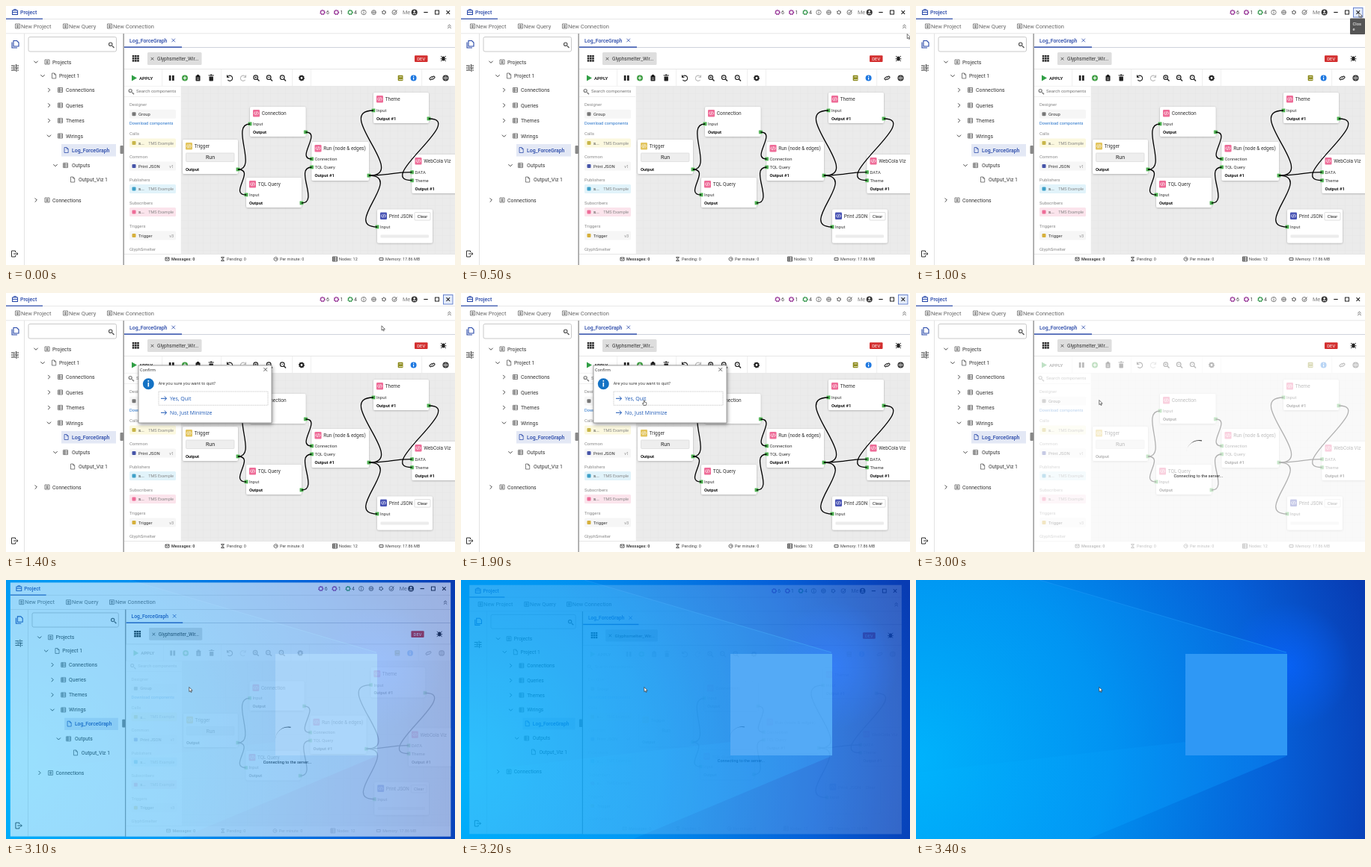
These frames come from a looping animation (600 px wide and 347 px high, 3.5 s). An HTML page:

```html
<!DOCTYPE html>
<html lang="en">
<head>
<meta charset="utf-8">
<title>Closing the project window</title>
<style>
html, body { margin: 0; width: 100%; height: 100%; overflow: hidden; background: #fff; }
svg { display: block; width: 100vw; height: 100vh; font-family: Roboto, Arial, sans-serif; }
.ui { font-family: "Open Sans", "Noto Sans", sans-serif; }
</style>
</head>
<body>
<svg id="stage" viewBox="0 0 600 347"></svg>
<script>
const BLUE = '#2747a8', INK = '#222', GREY = '#666', PINK = '#ee6c98', GREEN = '#4caf50';
const LOOP = 3500, STEP = 100;

const rect = (x, y, w, h, fill, more = '') =>
  `<rect x="${x}" y="${y}" width="${w}" height="${h}" fill="${fill}" ${more}/>`;
const text = (x, y, size, str, fill = INK, more = '') =>
  `<text x="${x}" y="${y}" font-size="${size}" fill="${fill}" ${more}>${str}</text>`;
const icon = (x, y, d, color = INK, width = 1) =>
  `<path transform="translate(${x} ${y})" d="${d}" fill="none" stroke="${color}" stroke-width="${width}"/>`;
const solid = (x, y, d, color = INK) =>
  `<path transform="translate(${x} ${y})" d="${d}" fill="${color}"/>`;
const dot = (x, y, r, fill, more = '') =>
  `<circle cx="${x}" cy="${y}" r="${r}" fill="${fill}" ${more}/>`;
const ring = (x, y, r, color, width = 1) =>
  dot(x, y, r, 'none', `stroke="${color}" stroke-width="${width}"`);
const group = (id, body, more = '') => `<g id="${id}" ${more}>${body}</g>`;
const bold = 'font-weight="700"', medium = 'font-weight="500"', middle = 'text-anchor="middle"';

const shape = {
  file: 'M-2.5-3.5H.7L2.7-1.5V3.5H-2.5ZM.7-3.5V-1.5H2.7',
  box: 'M-3-3H3V3H-3ZM-3-1H3M-3 1H3M-1-3V3',
  user: 'M-3-3H3V3H-3ZM-1.5 1.5H1.5M-1-1.3H1V.3H-1Z',
  right: 'M-1.3-2.6L1.3 0L-1.3 2.6',
  down: 'M-2.6-1.3L0 1.3L2.6-1.3',
  cross: 'M-2.3-2.3L2.3 2.3M2.3-2.3L-2.3 2.3',
  bug: 'M0-2V3M-3.5-3L-1-1M3.5-3L1-1M-4 .8H4M-3.5 4L-1 2M3.5 4L1 2',
  globe: 'M-3 0H3M0-3V3M-1.5-2.6Q-2.6 0-1.5 2.6M1.5-2.6Q2.6 0 1.5 2.6',
  search: 'M1.5 1.5L4 4',
  code: 'M-1.5-2L-3 0L-1.5 2M1.5-2L3 0L1.5 2M.6-2.4L-.6 2.4',
  arrow: 'M-4 0H3.5M.7-2.8L3.5 0L.7 2.8'
};
const lens = (x, y, color = INK, r = 2.6, mark = '') =>
  ring(x - .8, y - .8, r, color, 1.2) + icon(x, y, shape.search, color, 1.4) +
  (mark && icon(x - .8, y - .8, mark, color, .8));
const bug = (x, y) => icon(x, y, shape.bug, INK, .9) +
  `<ellipse cx="${x}" cy="${y + .6}" rx="2.1" ry="3" fill="${INK}"/>`;
const gear = (x, y, r, color, width) => ring(x, y, r, color, width) +
  dot(x, y, r + width / 2, 'none', `stroke="${color}" stroke-width="1.2" stroke-dasharray="1.3 1.3"`);

function titleBar() {
  let s = rect(0, 17, 600, .7, '#ddd') + rect(0, 16.6, 49, 1.2, BLUE) +
    rect(8.5, 6, 7, 5.5, 'none', `stroke="${BLUE}"`) + icon(12, 8.5, 'M-1.5-2.5V-4H1.5V-2.5M-3.5 0H3.5', BLUE, .9) +
    text(19, 11, 7, 'Project', BLUE, medium);
  [[423, 6, '#9c3f9c'], [441.5, 1, '#9c3f9c'], [460, 4, '#3b9a52']].forEach(([x, n, c]) => {
    s += gear(x, 8.5, 2.5, c, 1.2) + text(x + 5, 11.2, 7, n, '#444');
  });
  s += ring(478, 8.5, 3.2, GREY, .8) + rect(477.6, 7.5, .9, 3, GREY) + rect(477.6, 6, .9, .9, GREY) +
    ring(491.5, 8.5, 3, GREY, .7) + icon(491.5, 8.5, shape.globe, GREY, .6) +
    gear(505, 8.5, 2, GREY, .9) + ring(519, 8.5, 3, GREY, .9) + icon(519, 8.5, 'M-1.5 0L0 1.4L3.5-3', GREY, 1) +
    text(530, 11.2, 7.3, 'Me', '#777') + dot(545.7, 8.5, 4, '#333') + dot(545.7, 7.2, 1.3, '#fff') +
    icon(545.7, 8.5, 'M-2 2.2Q0 .4 2 2.2', '#fff', 1.1) +
    icon(561, 8.5, 'M-2.7 0H2.7', INK, 1.2) + rect(573.5, 6, 5, 5, 'none', `stroke="${INK}"`) +
    group('hover', rect(584.5, 2.5, 12.5, 12.5, '#e4ecfb', 'stroke="#4b6cc4" stroke-width=".8"')) +
    icon(590.8, 8.5, shape.cross, INK, 1.1);
  [[15.5, 20, 'New Project'], [79.5, 84, 'New Query'], [138.5, 143, 'New Connection']].forEach(([x, tx, label]) => {
    s += icon(x, 27, shape.user, GREY, .8) + text(tx, 29.8, 7.5, label, GREY);
  });
  return s + icon(592.5, 27.5, 'M-2.2-.3L0-2.4L2.2-.3M-2.2 2.4L0 .3L2.2 2.4', '#555', .9) + rect(0, 36.5, 600, .7, '#ddd');
}

function sidebar() {
  let s = rect(24, 37, .8, 310, '#ddd') +
    icon(13, 51, 'M-3-4.5H1.5L4-2V3H-3ZM-5-2.5V5H2', BLUE, 1.1) +
    icon(12, 83, 'M-5-3H0M2.5-3H5M1.5-5V-1M-5 0H-2.5M0 0H5M-1.2-2V2M-5 3H1M3.5 3H5M2-.2V5', '#333', 1) +
    icon(11.5, 332, 'M1-2V-4H-4V4H1V2M-1.5 0H4.5M2.7-1.8L4.5 0L2.7 1.8', '#333', 1) +
    rect(30, 41.5, 117.5, 19.5, '#fff', 'rx="2" stroke="#bbb" stroke-width=".8"') + lens(140.5, 52, '#555', 2.2) +
    rect(74, 185, 73, 16.5, '#e3e8f5') + rect(152.5, 187, 4.5, 11, '#888', 'rx="1"') +
    rect(156.5, 37, 1.3, 310, '#8a8a8a');
  const rows = [
    ['down', 40, 'user', 55, 62, 75, 'Projects'], ['down', 49, 'file', 64, 71, 93.5, 'Project 1'],
    ['right', 57.5, 'box', 72.5, 80, 112.5, 'Connections'], ['right', 57.5, 'box', 72.5, 80, 133, 'Queries'],
    ['right', 57.5, 'box', 72.5, 80, 153.5, 'Themes'], ['down', 57.5, 'box', 72.5, 80, 174, 'Wirings'],
    ['', 0, 'file', 80.5, 88, 193, 'Log_ForceGraph'], ['down', 66, 'box', 79.5, 88, 213.5, 'Outputs'],
    ['', 0, 'file', 89, 97, 232.5, 'Output_Viz 1'], ['right', 40, 'user', 55, 62, 260, 'Connections']
  ];
  rows.forEach(([fold, fx, kind, ix, tx, y, label]) => {
    const on = label === 'Log_ForceGraph';
    if (fold) s += icon(fx, y, shape[fold], '#444', 1);
    s += icon(ix, y, shape[kind], on ? BLUE : '#555', .75) + text(tx, y + 2.5, 6.9, label, on ? BLUE : '#333', on ? medium : '');
  });
  return s;
}

function header() {
  let s = text(165, 48.5, 6.9, 'Log_ForceGraph', BLUE, medium) + icon(223.7, 46, shape.cross, BLUE, .8) +
    rect(158, 55, 442, .8, '#c4c8d4') + rect(158, 54.4, 77, 1.4, BLUE) +
    rect(189, 62, 72.5, 17, '#dedede', 'rx="1.5"') + icon(195.5, 70.7, 'M-1.8-1.8L1.8 1.8M1.8-1.8L-1.8 1.8', '#555', 1) +
    text(202, 73, 6.5, 'Glyphsmelter_Wir...', '#333') +
    rect(546, 66.3, 17.5, 8.8, '#d32f2f', 'rx="1"') + text(554.7, 73, 5.9, 'DEV', '#fff', middle) +
    bug(584.5, 70) + rect(158, 84, 442, .7, '#ddd');
  for (let i = 0; i < 9; i++) s += rect(168.8 + i % 3 * 3.2, 66 + (i / 3 | 0) * 3.1, 2.6, 2.4, INK);
  return s;
}

function toolbar() {
  let s = solid(171, 96.5, 'M-3-4L4 0L-3 4Z', '#2f9e44') + text(178, 98.8, 6.1, 'APPLY', INK, bold) +
    rect(217.8, 93, 2.7, 7, INK) + rect(222, 93, 2.7, 7, INK) +
    dot(239, 96.5, 4, '#43a047') + icon(239, 96.5, 'M-2.2 0H2.2M0-2.2V2.2', '#fff', 1.2) +
    rect(253.5, 93.2, 6, 7.3, INK, 'rx=".7"') + rect(255, 92, 3, 2, INK) + icon(256.5, 97.5, 'M-1.5-1H1.5M-1.5 1H1.5', '#fff', .6) +
    rect(271.5, 94.5, 5.4, 6, INK, 'rx=".7"') + icon(274.2, 93, 'M-3.6 0H3.6M-1-1H1', INK, 1.1) +
    icon(299, 96.5, 'M-3.5-4V-1H-.5M-3.2-1.3A3.6 3.6 0 1 1-2.6 2.7', INK, 1.1) +
    icon(317, 96.5, 'M3.5-4V-1H.5M3.2-1.3A3.6 3.6 0 1 0 2.6 2.7', '#bbb', 1.1) +
    lens(334.5, 96.5, INK, 2.8, 'M-1.4 0H1.4M0-1.4V1.4') + lens(352, 96.5, INK, 2.8, 'M-1.4 0H1.4') +
    lens(370, 96.5, INK, 2.8, 'M-.8 0H.8') + gear(395, 96.5, 2.4, INK, 2) +
    rect(523.7, 92.8, 6.8, 7.4, '#8c8a1c', 'rx="1"') + rect(525.3, 94.5, 4, .8, '#fff') + rect(525, 98.3, 5, .7, '#fff') +
    dot(544.6, 96.5, 4, '#1e78e0') + rect(544, 95.8, 1.2, 3, '#fff') + rect(544, 93.8, 1.2, 1.2, '#fff') +
    icon(569.5, 96.5, 'M-.5 1.2L-1.8 2.5A1.7 1.7 0 0 1-3.5 .6L-1.3-1.4A1.7 1.7 0 0 1 .9-.8M.5-1.2L1.8-2.5A1.7 1.7 0 0 1 3.5-.6L1.3 1.4A1.7 1.7 0 0 1-.9 .8', INK, 1.1) +
    dot(587.5, 96.5, 4, INK) + icon(587.5, 96.5, shape.globe, '#fff', .6);
  [208.5, 287, 382, 407, 555.5].forEach(x => s += rect(x, 85, .6, 22, '#e4e4e4'));
  return s + rect(158, 107, 442, .7, '#ddd');
}

function palette() {
  let s = rect(158, 107.5, 75.5, 224.5, '#fff') + lens(167, 114.3, '#777', 2) +
    text(174, 116.4, 6, 'Search components', '#777') + rect(158, 121, 75, .6, '#e4e4e4');
  const row = (title, ty, y, tint, color, name, tag) => {
    s += text(165, ty, 5.9, title, '#888') + rect(165, y, 62, 12, tint, 'rx="1.5"') +
      rect(168.5, y + 3.6, 5, 5, color, 'rx="1"') + text(177, y + 8.3, 5.9, name, '#333') +
      text(224, y + 8.2, 5.5, tag, '#888', 'text-anchor="end"');
  };
  row('Designer', 134, 138.7, '#f6f6f6', '#777', 'Group', '');
  s += text(165, 158.5, 5.7, 'Download components', '#2673c9');
  row('Calls', 173, 177.5, '#fbf8df', '#c8b64a', 's...', 'TMS Example');
  row('Common', 204, 208.5, '#f6f6f6', '#4655a8', 'Print JSON', 'v1');
  row('Publishers', 235, 239, '#e1f3fa', '#3fa0c8', 's...', 'TMS Example');
  row('Subscribers', 266, 270, '#fbe4ec', PINK, 's...', 'TMS Example');
  row('Triggers', 297, 301.5, '#f6f6f6', '#d6b03c', 'Trigger', 'v3');
  return s + text(165, 328, 5.9, 'GlyphSmelter', '#888');
}

function graph() {
  const port = (x, y) => rect(x - 2.6, y - 2.6, 5.2, 5.2, GREEN, 'rx="1" stroke="#e8f5e9" stroke-width=".5"');
  const wire = (x1, y1, x2, y2, bend) =>
    icon(0, 0, `M${x1} ${y1}C${x1 + bend} ${y1} ${x2 - bend} ${y2} ${x2} ${y2}`, '#000', 1.3);
  // Each row: label, baseline, side (-1 input, 1 output).
  const node = (x, y, w, h, color, title, rows, extra = '') => {
    let s = rect(x, y, w, h, '#fff', 'rx="2" filter="url(#shade)"') +
      rect(x + 4, y + 4, 9, 9.5, color, 'rx="1.3"') + icon(x + 8.5, y + 8.7, shape.code, '#fff', .8) +
      text(x + 15.7, y + 11.3, 6.5, title, '#333') + extra;
    rows.forEach(([label, ry, side]) => {
      s += text(x + 4, ry, 5.9, label, side > 0 ? '#111' : '#333', side > 0 ? bold : '') +
        port(side > 0 ? x + w : x, ry - 2.1);
    });
    return s;
  };
  let s = rect(233.5, 107.5, 366.5, 224.5, '#ebebeb');
  for (let x = 243; x < 600; x += 10) s += rect(x, 108, .4, 224, '#e4e4e4');
  for (let y = 117; y < 332; y += 10) s += rect(233.5, y, 366.5, .4, '#e4e4e4');
  return s +
    node(326, 135, 74.5, 40, PINK, 'Connection', [['Input', 160, -1], ['Output', 171, 1]]) +
    node(236, 179, 74, 46, '#e3c55f', 'Trigger', [['Output', 221, 1]],
      rect(240.5, 197, 64.5, 11.5, '#eee', 'rx="1" stroke="#d5d5d5" stroke-width=".6"') +
      text(273, 205.2, 7, 'Run', '#222', middle)) +
    node(321, 230, 74, 40, PINK, 'TQL Query', [['Input', 255, -1], ['Output', 266, 1]]) +
    node(408.5, 182, 76.5, 52, PINK, 'Run (node &amp; edges)', [['Connection', 207, -1], ['TQL Query', 218, -1], ['Output #1', 229.3, 1]]) +
    node(491, 116, 74, 41, PINK, 'Theme', [['Input', 142, -1], ['Output #1', 153, 1]]) +
    node(542.5, 199, 75, 52, PINK, 'WebCola Viz', [['DATA', 224.7, -1], ['Theme', 235.8, -1], ['Output #1', 247, 1]]) +
    node(496, 272.5, 74, 45, '#4a55b5', 'Print JSON', [['Input', 298, -1]],
      rect(546, 276.5, 21, 10.5, '#fff', 'rx="1" stroke="#ccc" stroke-width=".6"') +
      text(556.5, 283.8, 5.9, 'Clear', '#222', middle) + rect(500.5, 306.5, 64.5, 4, '#ececec', 'rx="1"')) +
    wire(310, 219, 326, 158, 27) + wire(310, 219, 321, 253, 24) +
    wire(400.5, 169, 408.5, 205, 22) + wire(395, 264, 408.5, 216, 24) +
    wire(485, 227.2, 491, 140, 55) + wire(485, 227.2, 542.5, 222.6, 28) +
    wire(485, 227.2, 496, 296, 48) + wire(565, 151, 542.5, 233.7, 52);
}

function statusBar() {
  let s = rect(158, 332, 442, 15, '#fff') + rect(158, 332, 442, .7, '#ddd');
  const items = [[221, 'Messages: 0'], [295, 'Pending: 0'], [366, 'Per minute: 0'], [445, 'Nodes: 12'], [507, 'Memory: 17.86 MB']];
  items.forEach(([x, label], i) => {
    s += icon(x - 5.5, 339, ['M-2.5-2H2.5V2H-2.5ZM-2.5-2L0 .5L2.5-2', 'M-2-2.5H2L-2 2.5H2Z', 'M0-2.5A2.5 2.5 0 1 0 .1-2.5M0-1V0H1.5', shape.box, 'M-2.5-1.5H2.5V1.5H-2.5Z'][i], '#444', .9) +
      text(x, 341.2, 5.5, label, '#444', i ? '' : bold);
  });
  return s;
}

function dialog() {
  const option = (y, label) => icon(211, y, shape.arrow, '#1b57b5', 1) + text(219, y + 2.8, 7, label, '#1b57b5');
  return rect(177, 97, 178, 77, '#fff', 'stroke="#777" stroke-width=".7" filter="url(#drop)"') +
    text(179, 105, 5.5, 'Confirm', '#222') + icon(346.7, 102.5, shape.cross, '#333', .8) +
    dot(190.3, 121.7, 7.5, '#1472c4') + rect(189.5, 120, 1.6, 5.5, '#fff') + rect(189.5, 117, 1.6, 1.7, '#fff') +
    text(203.7, 123, 5.4, 'Are you sure you want to quit?', '#222') +
    rect(204, 132, 146, 18.3, '#fff', 'id="yes" stroke="#aaa" stroke-width=".6" stroke-dasharray="1 .7"') +
    option(141.3, 'Yes, Quit') + option(160.3, 'No, Just Minimize');
}

const desktop = rect(0, 0, 600, 347, 'url(#sky)') + rect(0, 0, 600, 347, 'url(#glow)') +
  '<path d="M165 0L495 97V236L230 347H0V0Z" fill="url(#beam)"/>' +
  '<path d="M360 217L495 236L230 347H0V258Z" fill="url(#beam)"/>' +
  icon(0, 0, 'M165 0L495 97', '#1c95f5', .6) + rect(360, 99, 136, 136, '#2f98f5');

const defs = `<defs>
  <radialGradient id="sky" gradientUnits="userSpaceOnUse" cx="0" cy="240" r="640">
    <stop stop-color="#00b1fb"/><stop offset=".4" stop-color="#008fef"/>
    <stop offset=".75" stop-color="#0660d8"/><stop offset="1" stop-color="#083bb2"/></radialGradient>
  <radialGradient id="glow" gradientUnits="userSpaceOnUse" cx="498" cy="115" r="85">
    <stop stop-color="#0864ff" stop-opacity=".75"/><stop offset="1" stop-color="#0864ff" stop-opacity="0"/></radialGradient>
  <linearGradient id="beam"><stop stop-color="#00b8ff" stop-opacity=".2"/>
    <stop offset="1" stop-color="#0c94ff" stop-opacity=".2"/></linearGradient>
  <filter id="shade" x="-10%" y="-10%" width="120%" height="125%"><feDropShadow dx="0" dy=".6" stdDeviation="1" flood-opacity=".3"/></filter>
  <filter id="drop" x="-10%" y="-10%" width="120%" height="130%"><feDropShadow dx="1" dy="2" stdDeviation="2.5" flood-opacity=".4"/></filter>
  <clipPath id="frame">${rect(0, 0, 600, 347, '#000')}</clipPath>
</defs>`;

const pointer = 'stroke="#222" stroke-width=".7" stroke-linejoin="round" fill="#fff"';
stage.innerHTML = defs + desktop +
  group('app', rect(0, 0, 600, 347, '#fff') + titleBar() + sidebar() + header() + toolbar() + graph() + palette() + statusBar() +
    group('busy', rect(158, 85, 442, 262, '#fff', 'id="veil"') +
      group('spin', solid(379, 215, 'M-18-1A18 18 0 0 1 3-17.8V-16.6A17 17 0 0 0-18-1Z', '#444')) +
      text(344.5, 247, 5.7, 'Connecting to the server...', '#222')) +
    group('tip', rect(580, 16.5, 20, 21.5, '#555', 'rx="1"') + text(583.5, 25.5, 5.8, 'Clos', '#fff') + text(583.5, 33.3, 5.8, 'e', '#fff')) +
    group('ask', dialog(), 'class="ui"'), 'clip-path="url(#frame)"') +
  group('mouse', `<path id="arrow" d="M0 0V7L1.6 5.6L2.7 8L3.8 7.5L2.8 5.2H5Z" ${pointer}/>` +
    `<path id="hand" d="M-.7 .6Q0-.5 .7 .6V3L3.4 3.8V6L2.6 8H-1L-2.8 5L-2.2 4.4L-.7 5.4Z" ${pointer}/>`);

const $ = id => document.getElementById(id);
const show = (id, on) => $(id).setAttribute('display', on ? 'inline' : 'none');
const ramp = (t, from, to) => Math.min(1, Math.max(0, (t - from) / (to - from)));
const ease = u => u * u * (3 - 2 * u);
const mix = (a, b, u) => a + (b - a) * u;

function draw(now) {
  const t = Math.floor(now % LOOP / STEP) * STEP;
  const enter = ease(ramp(t, 200, 700)), travel = ease(ramp(t, 1200, 1800));
  const x = mix(mix(604, 592, enter), 244.8, travel), y = mix(mix(90, 9, enter), 143.5, travel);
  const asking = t >= 1200 && t < 2700, onYes = t >= 1700 && t < 2700;

  show('mouse', t >= 200);
  $('mouse').setAttribute('transform', `translate(${x} ${y}) scale(.88)`);
  show('hand', onYes);
  show('arrow', !onYes);
  show('hover', t >= 700 && t < 2700);
  show('tip', t >= 900 && t < 1200);
  show('ask', asking);
  $('yes').setAttribute('fill', t >= 2300 ? '#dcdcdc' : '#fff');

  show('busy', t >= 2800);
  $('veil').setAttribute('opacity', .69 * ramp(t, 2600, 3000) + .16 * ramp(t, 3000, 3200));
  $('spin').setAttribute('transform', `rotate(${(Math.min(t, 3000) - 3000) * .36} 379 215)`);

  const scale = 1 - .037 * ramp(t, 3000, 3200);
  $('app').setAttribute('transform', `translate(300 173.5) scale(${scale}) translate(-300 -173.5)`);
  $('app').setAttribute('opacity', t < 3100 ? 1 : t < 3200 ? .6 : .18);
  show('app', t < 3300);
}

const start = performance.now();
function tick() {
  draw(performance.now() - start);
  requestAnimationFrame(tick);
}
tick();
</script>
</body>
</html>
```
